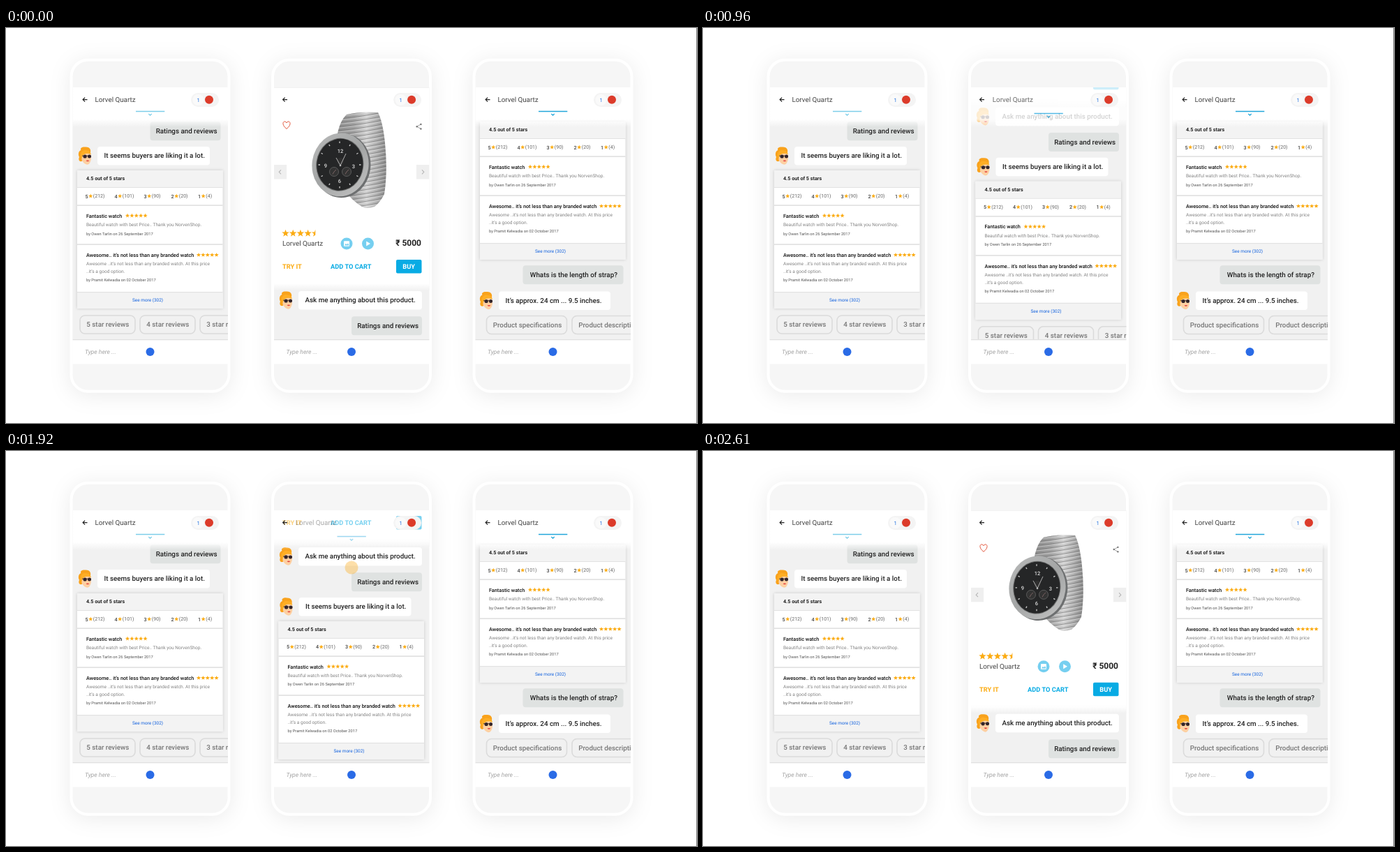
These frames come from a looping animation (990x566 px, 2880 ms). An HTML page:

```html
<!DOCTYPE html>
<html lang="en">
<head>
<meta charset="utf-8">
<title>Shopping chat on three phones</title>
<style>
html, body { margin: 0; width: 100%; height: 100%; overflow: hidden; background: #fff; }
svg { display: block; width: 990px; height: 566px; }
text { font-family: Roboto, Arial, sans-serif; text-rendering: geometricPrecision; white-space: pre; }
.body { filter: drop-shadow(0 4px 15px rgba(0, 0, 0, .08)); }
.card { filter: drop-shadow(0 0 2px rgba(0, 0, 0, .16)); }
</style>
</head>
<body>
<svg id="stage" viewBox="0 0 990 566"></svg>
<script>
const GOLD = '#fbab12', BLUE = '#08abe4', INK = '#222', PALE = '#f1f1f1';
const LOOP = 2880, STEP = 30, TRAVEL = 279, PITCH = 288.5;
const PRODUCT = 'Lorvel Quartz';

// Text is placed by the middle of its capitals.
const text = (x, y, s, size, fill = INK, more = '') =>
  `<text x="${x}" y="${y + size * .356}" font-size="${size}" fill="${fill}" ${more}>${s}</text>`;
const medium = 'font-weight="500"', bold = 'font-weight="700"', middle = 'text-anchor="middle"';
const rect = (x, y, w, h, fill, r = 0, more = '') =>
  `<rect x="${x}" y="${y}" width="${w}" height="${h}" rx="${r}" fill="${fill}" ${more}/>`;
const circle = (x, y, r, fill, more = '') => `<circle cx="${x}" cy="${y}" r="${r}" fill="${fill}" ${more}/>`;
const ellipse = (x, y, rx, ry, fill, more = '') =>
  `<ellipse cx="${x}" cy="${y}" rx="${rx}" ry="${ry}" fill="${fill}" ${more}/>`;
const line = (d, color, width = 1, more = '') =>
  `<path d="${d}" fill="none" stroke="${color}" stroke-width="${width}" ${more}/>`;
const shape = (d, fill) => `<path d="${d}" fill="${fill}"/>`;
const group = (x, y, inner, more = '') => `<g transform="translate(${x} ${y})" ${more}>${inner}</g>`;

function star(x, y, r, half) {
  const points = [];
  for (let i = 0; i < 10; i++) {
    if (half && i > 0 && i < 5) continue;
    const a = (i * 36 - 90) * Math.PI / 180, d = i % 2 ? r * .42 : r;
    points.push((x + d * Math.cos(a)).toFixed(2) + ',' + (y + d * Math.sin(a)).toFixed(2));
  }
  return `<polygon points="${points.join(' ')}" fill="${GOLD}"/>`;
}
const stars = (x, y, r, gap, full, half) =>
  Array.from({ length: full + (half ? 1 : 0) }, (_, i) => star(x + i * gap, y, r, i >= full)).join('');

const avatar = (x, y) => group(x, y,
  shape('M-5 8C-9 9-10 5-8.5 2C-11-3-9-7-6-8C-8-11-4-13 0-12.5C7-13 9-8 7-3Z', '#f9a21c') +
  shape('M-5-2Q2-6 8-2L8.4 5Q7 12.5 2.8 12.8Q-2 12-5 6Z', '#fdd0a2') +
  shape('M-6.5 3Q-8-5-2-8Q7-9 8.5-2Q1-5.5-4 0Q-4 4-6.5 3Z', '#ffae25') +
  circle(-.4, 1, 2.6, '#33252a') + circle(6, 1, 2.5, '#33252a') +
  line('M-4.5 .2L8.4 .2', '#33252a', .9) +
  shape('M1 7Q3.4 6 5.8 7Q3.6 9.6 1 7Z', '#e23b3b'));

const reply = (x, y, w, s) => avatar(x - 17.5, y) +
  rect(x, y - 13, w, 26.5, '#fff', 4) + text(x + 9.5, y, s, 9.8, INK, medium);
const ask = (x, y, w, s, pad) => rect(x, y - 13.5, w, 27, '#dfe2e1', 4) +
  text(x + pad, y, s, 9.8, INK, medium);

const chip = (x, y, w, s) => rect(x, y - 13, w, 26, 'none', 7, 'stroke="#dbdbdb" stroke-width="1.6"') +
  text(x + 9.3, y, s, 9.8, '#777', medium);

function card() {
  const counts = [[113.5, 5, 212], [155.5, 4, 101], [197.5, 3, 90], [236.5, 2, 20], [275, 1, 4]];
  const tally = counts.map(([x, n, count]) => text(x, 241, n, 7.2, '#444', medium) +
    star(x + 7.7, 240.8, 3.3) + text(x + 11.3, 241, `(${count})`, 7, '#666')).join('');
  const rule = (y, h) => rect(102, y, 208.5, h, '#e2e2e2');
  return rect(102, 204, 208.5, 198, '#fff', 1, 'class="card"') +
    rect(102, 204, 208.5, 24, '#f3f3f3') + text(115, 215.7, '4.5 out of 5 stars', 7.2, INK, bold) +
    rule(228, 1) + tally + rule(253.3, 1.7) +
    text(115, 269, 'Fantastic watch', 7.25, '#111', medium) + stars(174, 268.9, 3.3, 6.4, 5) +
    text(115, 282, 'Beautiful watch with best Price.. Thank you NorvenShop.', 6.6, '#848484') +
    text(115, 294.5, 'by Owen Tarlin on 26 September 2017', 5.7, '#555') +
    rule(309.3, 1.7) +
    text(115, 325.5, 'Awesome.. it’s not less than any branded watch', 7.3, '#111', medium) +
    stars(276, 325.2, 3.3, 6.4, 5) +
    text(115, 338, 'Awesome ..it’s not less than any branded watch. At this price', 6.6, '#848484') +
    text(115, 348.7, '..it’s a good option.', 6.6, '#848484') +
    text(115, 361, 'by Pramit Kelwadia on 02 October 2017', 5.7, '#555') +
    rect(102, 379, 208.5, 23, '#f3f3f3') + rule(378, 1.2) +
    text(203, 390, 'See more (302)', 6.45, '#1362de', middle);
}

const reviews = ask(206.5, 147.8, 101, 'Ratings and reviews', 8.2) +
  reply(131, 183, 161, 'It seems buyers are liking it a lot.') + card() +
  chip(106, 425, 79, '5 star reviews') + chip(192, 425, 79, '4 star reviews') + chip(278, 425, 79, '3 star reviews');

const strap = group(-577, 0, group(577, -70, card()) +
  ask(740.5, 353.8, 144, 'Whats is the length of strap?', 10.3) +
  reply(706, 390.5, 160, 'It’s approx. 24 cm ... 9.5 inches.') +
  chip(688.5, 425.5, 115, 'Product specifications') + chip(811, 425.5, 115, 'Product description'));

function watch() {
  let links = '', ticks = '';
  for (let y = 118; y < 268; y += 5.6)
    links += line(`M472 ${y + 7}Q515 ${y + 3} 550 ${y - 5}`, '#6a6a6a', .9, 'opacity=".6"') +
      line(`M472 ${y + 9}Q515 ${y + 5} 550 ${y - 3}`, '#fff', 1.2, 'opacity=".35"');
  for (let i = 0; i < 12; i++) {
    const a = i * Math.PI / 6, c = Math.cos(a), s = Math.sin(a);
    ticks += line(`M${478 + 28 * c} ${196 + 31 * s}L${478 + 30.5 * c} ${196 + 33.5 * s}`, '#ccc', 1.3);
  }
  const dial = (x, y) => circle(x, y, 6.5, '#333', 'stroke="#666" stroke-width=".8"') +
    line(`M${x} ${y}l3-3M${x} ${y}l-2 3.5`, '#977', .7);
  const numeral = (x, y, s) => text(x, y, s, 7.5, '#ddd', medium + ' ' + middle);
  const band = 'M474 156Q478 133 488 124Q510 119 533 121Q540 135 543 165Q547 205 542 238Q536 250 528 256Q516 260 510 256Q497 248 488 236Z';
  return `<clipPath id="band"><path d="${band}"/></clipPath>` + shape(band, 'url(#steel)') +
    `<g clip-path="url(#band)">${links}</g><g transform="rotate(8 480 196)">` +
    ellipse(482, 197, 40.5, 46, '#6d6f70') + ellipse(479, 196, 40.5, 45.5, 'url(#rim)') +
    ellipse(478.3, 196, 34, 38, '#6a6b6b') + ellipse(478.3, 196, 33, 37, '#252627') + '</g>' + ticks +
    dial(470, 206) + dial(488, 206) + circle(479, 191, 5, '#2f2f2f') +
    numeral(479, 176, '12') + numeral(498, 198, '3') + numeral(478, 219, '6') + numeral(458, 197, '9') +
    line('M479 197L487 180M479 197L473 186', '#bbb', .9) + circle(479, 197, 1.3, '#bbb');
}

const arrowBox = (x, d) => rect(x, 196, 18.5, 20.5, '#efefef') + line(d, '#b5b5b5', 1.1);
const product = group(-PITCH, 0,
  rect(383, 86, 225, 280, '#fff') + rect(383, 366, 225, 10, 'url(#ledge)') + watch() +
  line('M402 144.5C395 139 396.5 134 399.3 134Q401.2 134 402 136Q402.8 134 404.7 134C407.5 134 409 139 402 144.5Z', '#e4573d', 1) +
  line('M594.3 138L588.7 141.2L594.3 144.5', '#888', .8) +
  circle(594.4, 138, 1.2, '#777') + circle(588.7, 141.2, 1.2, '#777') + circle(594.4, 144.5, 1.2, '#777') +
  arrowBox(383.5, 'M394 203.3L391.2 206.3L394 209.3') + arrowBox(588, 'M596 203.3L598.8 206.3L596 209.3') +
  stars(400.5, 294.3, 5.5, 10.7, 4, true) + text(396, 308.7, PRODUCT, 9.8, '#444') +
  circle(488, 309, 8.5, '#76cff0') + circle(518.5, 309, 8.5, '#76cff0') +
  rect(484, 305.2, 8, 7.6, '#fff', 1) + shape('M485 311.6l2-2.8 1.5 1.6 1.5-2.2 1.6 3.4Z', '#76cff0') +
  shape('M516.2 305.5L522 309L516.2 312.5Z', '#fff') +
  text(595, 308, '₹ 5000', 12, INK, bold + ' text-anchor="end"') +
  text(396, 341.6, 'TRY IT', 9.3, GOLD, bold) + text(465, 341.6, 'ADD TO CART', 9.3, BLUE, bold) +
  rect(559, 332, 36.5, 19.5, BLUE, 2) + text(577.2, 341.8, 'BUY', 9.3, '#fff', bold + ' ' + middle) +
  reply(419, 390, 177, 'Ask me anything about this product.'));

// back, title and pill nudge those header parts sideways.
function phone(n, content, { handle, handleY = 119.5, back = 0, title = 0, pill = 0 }) {
  return group(n * PITCH, 0,
    rect(93.5, 45.7, 226, 475, '#f6f6f6', 24, 'class="body" stroke="#fff" stroke-width="4"') +
    `<g clip-path="url(#screen)">${rect(95, 85, 224, 362, PALE)}${content}` +
    `<g id="head${n}">${rect(95, 85, 224, 57, 'url(#fade)')}${text(127.5 + title, 102.6, PRODUCT, 9.8, '#444')}` +
    line(`M186 ${handleY}H227.3`, handle, 1.5) + line(`M204.3 ${handleY + 3.5}l2.2 2 2.2-2`, handle, 1.3) + '</g>' +
    line(`M${116.5 + back} 102.6h-6.4m3-3l-3 3 3 3`, '#222', 1.2) +
    rect(265 + pill, 93, 40, 20, '#f4f4f4', 10) + circle(275.5 + pill, 103, 8, '#fafafa') +
    text(275.5 + pill, 103.2, '1', 7.5, '#1f6fe0', middle) + circle(291 + pill, 102.7, 6, '#dc3b2a') +
    (n === 1 ? circle(206.5, 0, 9.5, '#f9b233', 'id="touch" fill-opacity=".42"') : '') + '</g>' +
    rect(95.5, 446, 222.5, 35.5, '#fff') + rect(95.5, 446, 222.5, 1.3, '#e0e0e0') +
    text(113, 463.7, 'Type here ...', 8.6, '#a3a3a3', 'font-style="italic"') + circle(206.5, 464, 6, '#2a6be6'));
}

const gradient = (id, x2, y2, stops) => `<linearGradient id="${id}" x2="${x2}" y2="${y2}">` +
  stops.map(([at, color, alpha = 1]) => `<stop offset="${at}" stop-color="${color}" stop-opacity="${alpha}"/>`).join('') + '</linearGradient>';

const $ = id => document.getElementById(id);
$('stage').innerHTML = '<defs>' +
  '<clipPath id="screen"><rect x="95.5" y="85" width="222.5" height="361.5"/></clipPath>' +
  gradient('fade', 0, 1, [[0, '#fff'], [.8, '#fff'], [1, '#fff', 0]]) +
  gradient('ledge', 0, 1, [[0, '#fff'], [1, PALE]]) +
  gradient('steel', 1, 0, [[0, '#8a8a8a'], [.35, '#a2a2a2'], [.6, '#d0d0d0'], [.8, '#b0b0b0'], [1, '#858585']]) +
  gradient('rim', 1, 1, [[0, '#b9baba'], [.5, '#a3a5a5'], [1, '#c4c4c4']]) + '</defs>' +
  phone(0, reviews, { handle: '#7dcde9' }) +
  phone(1, `<g id="scroll">${product}${group(0, TRAVEL, reviews)}</g>`,
    { handle: '#2aa9e0', handleY: 122.6, back: -2, title: -1.2, pill: 1.6 }) +
  phone(2, strap, { handle: '#22a6da' }) +
  rect(989, 0, 1, 566, '#808080');

const ramp = (t, from, to) => Math.min(1, Math.max(0, (t - from) / (to - from)));

// Cubic Bezier (.4, 0, .2, 1), solved for x by bisection.
function ease(x) {
  let low = 0, high = 1;
  for (let i = 0; i < 24; i++) {
    const s = (low + high) / 2, q = 1 - s;
    if (1.2 * q * q * s + .6 * q * s * s + s ** 3 < x) low = s; else high = s;
  }
  return low * low * (3 - 2 * low);
}

function draw(now) {
  const t = Math.floor(now % LOOP / STEP) * STEP;
  const up = ease(ramp(t, 290, 1232)), down = ease(ramp(t, 1734, 2640));
  const offset = TRAVEL * (up - down);
  $('scroll').setAttribute('transform', `translate(0 ${-offset.toFixed(2)})`);
  $('head1').setAttribute('opacity', ramp(t, 780, 1005) - ramp(t, 1740, 2070));

  const pulling = t >= 1710;
  const alpha = pulling ? 1 - ramp(t, 1950, 2090) : t >= 240 ? 1 - ramp(t, 660, 780) : 0;
  $('touch').setAttribute('cy', pulling ? 127 + TRAVEL - offset : 441 - offset);
  $('touch').setAttribute('opacity', alpha);
}

const start = performance.now();
function tick() {
  draw(performance.now() - start);
  requestAnimationFrame(tick);
}
tick();
</script>
</body>
</html>
```
